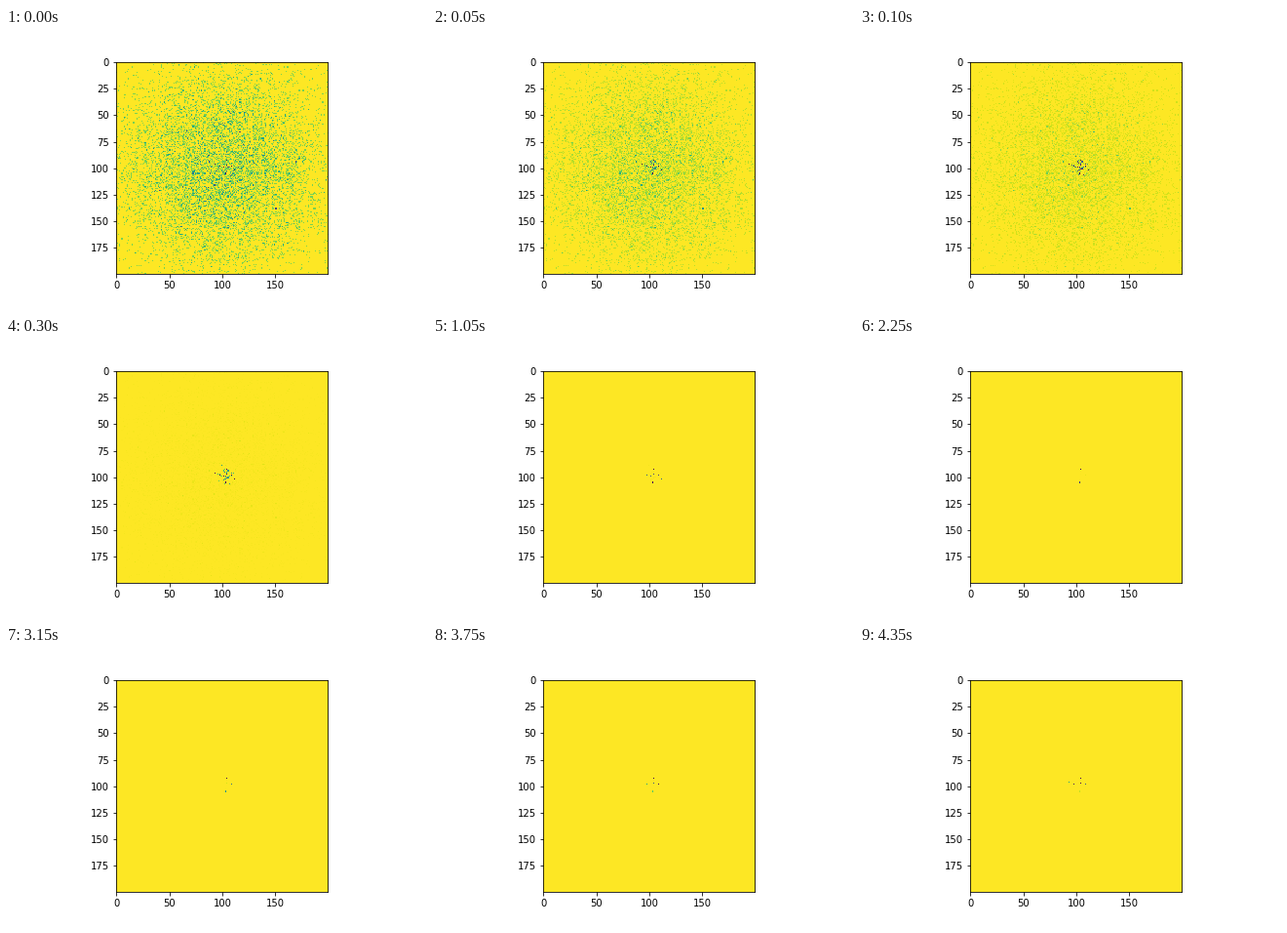
Recreate the animation shown at these times as a matplotlib script. Size 432 px wide and 288 px high, loop 4.4 s.

```python
import numpy as np
import matplotlib.pyplot as plt
from matplotlib.animation import FuncAnimation

SIZE = 200
FRAMES = 88
INTERVAL = 50
NEVER = 999

rng = np.random.default_rng(11)

# Wide gaussian cloud; every cell dims at its own rate
points = rng.normal(SIZE / 2, 50, (9500, 2))
edges = np.arange(SIZE + 1)
counts = np.histogram2d(points[:, 0], points[:, 1], bins=(edges, edges))[0]
cloud = np.clip(counts / 5, 0, 1)
rate = rng.uniform(0.45, 0.66, cloud.shape)

# Short-lived cluster near the centre
cluster = rng.normal((102, 99), 4.2, (30, 2)).round().astype(int)
brief_x, brief_y = np.clip(cluster, (93, 87), (110, 107)).T
brief_amp = rng.uniform(0.4, 1, 30)
brief_life = rng.uniform(5, 12, 30)

# Lasting cells: column, row, fade-out time, time of return
CELLS = [
    (104, 93, NEVER, NEVER),
    (103, 105, 70, NEVER),
    (108, 98, 33, 52),
    (104, 97, 30, 62),
    (97, 98, 28, 68),
    (93, 96, 14, 80),
    (101, 99, 28, NEVER),
    (111, 102, 27, NEVER),
]


def strength(i, fade, back):
    swell = np.sin(np.pi * np.clip((i - back) / 48, 0, 1))
    return max(np.exp(-(i / fade) ** 4), swell)


def field(i):
    grid = cloud * rate ** i
    glow = brief_amp * np.exp(-(i / brief_life) ** 2) * min(1, 0.3 + 0.35 * i)
    np.maximum.at(grid, (brief_y, brief_x), glow)
    for x, y, fade, back in CELLS:
        grid[y, x] = max(grid[y, x], strength(i, fade, back))
    return -grid


fig, ax = plt.subplots(figsize=(6, 4), dpi=72, facecolor="white")
fig.subplots_adjust(left=0.125, right=0.9, bottom=0.125, top=0.88)
image = ax.imshow(field(0), cmap="viridis", vmin=-1, vmax=0,
                  interpolation="nearest")
ax.set_xticks(range(0, SIZE, 50))
ax.set_yticks(range(0, SIZE, 25))


def update(i):
    image.set_data(field(i))
    return [image]


anim = FuncAnimation(fig, update, frames=FRAMES, interval=INTERVAL,
                     repeat=True, repeat_delay=0, blit=False)
plt.show()
```
